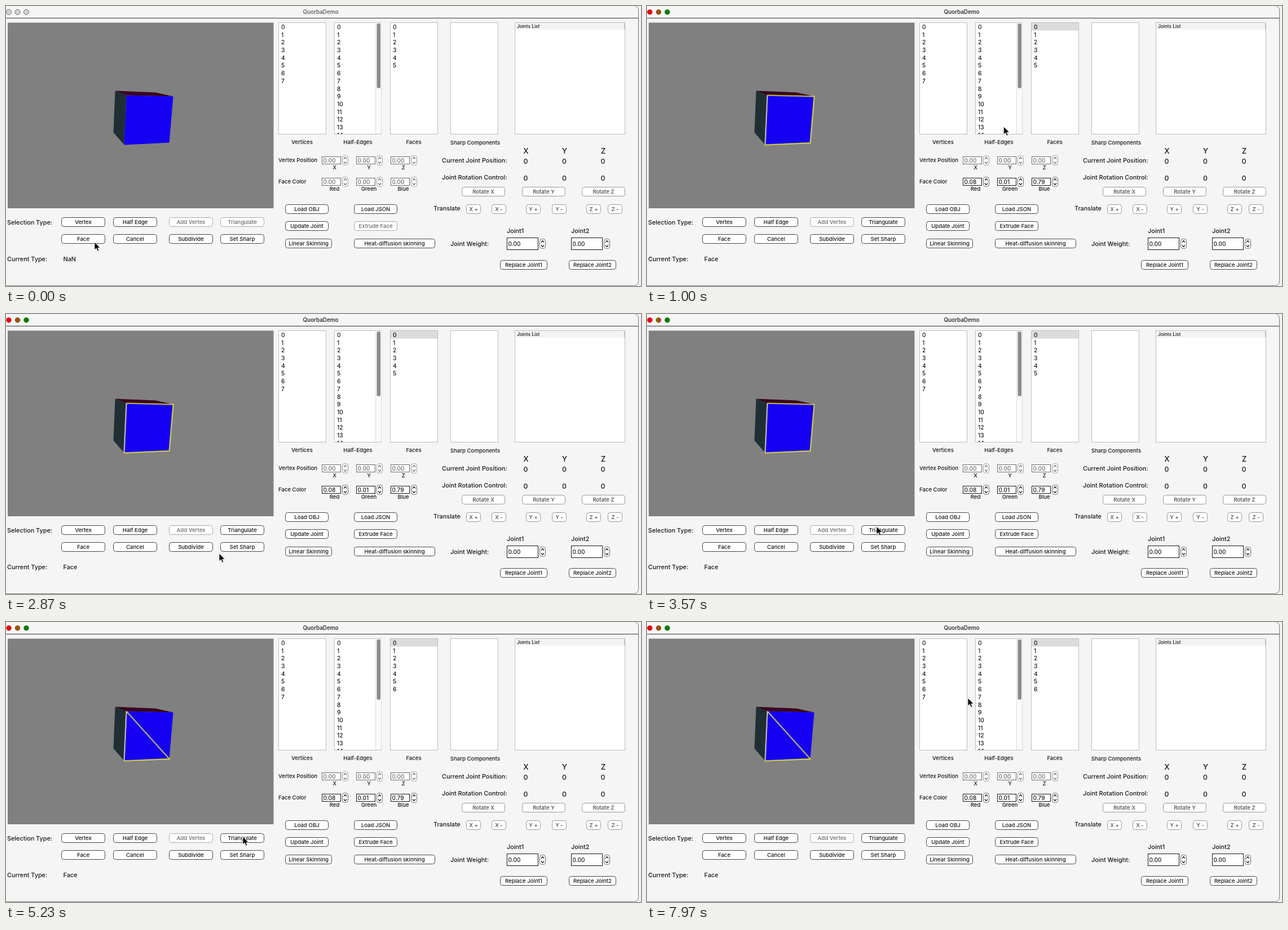
Write an HTML page that moves like this. It is 1126 px wide and 497 px high and loops after 8000 ms.

```html
<!DOCTYPE html>
<html lang="en">
<head>
<meta charset="utf-8">
<style>
html, body { margin: 0; width: 100%; height: 100%; overflow: hidden; background: #f3f3f3; }
svg { display: block; width: 1126px; height: 497px; font-family: Inter, Roboto, sans-serif; }
text { white-space: pre; font-weight: 500; }

/* Pairs of states: -off shows before the switch, -on after it. */
[class$="-off"], [class$="-on"] { animation: 8s step-end infinite; }
.focus-off { animation-name: focus-off; }
.focus-on { animation-name: focus-on; }
.mode-off { animation-name: mode-off; }
.mode-on { animation-name: mode-on; }
.pick-off { animation-name: pick-off; }
.pick-on { animation-name: pick-on; }
.split-off { animation-name: split-off; }
.split-on { animation-name: split-on; }
@keyframes focus-off { 0% { opacity: 1 } .6%, 100% { opacity: 0 } }
@keyframes focus-on { 0% { opacity: 0 } .6%, 100% { opacity: 1 } }
@keyframes mode-off { 0% { opacity: 1 } 1.4%, 100% { opacity: 0 } }
@keyframes mode-on { 0% { opacity: 0 } 1.4%, 100% { opacity: 1 } }
@keyframes pick-off { 0% { opacity: 1 } 6%, 100% { opacity: 0 } }
@keyframes pick-on { 0% { opacity: 0 } 6%, 100% { opacity: 1 } }
@keyframes split-off { 0% { opacity: 1 } 61%, 100% { opacity: 0 } }
@keyframes split-on { 0% { opacity: 0 } 61%, 100% { opacity: 1 } }

#cursor { animation: roam 8s linear infinite; }
@keyframes roam {
  0% { transform: translate(157px, 419px) }
  .8% { transform: translate(157px, 419px); animation-timing-function: ease-in-out }
  5.5% { transform: translate(248px, 205px) }
  7% { transform: translate(249px, 205px); animation-timing-function: ease-in }
  12.5% { transform: translate(632px, 214px); animation-timing-function: ease-out }
  16.25% { transform: translate(705px, 206px) }
  20% { transform: translate(705px, 206px); animation-timing-function: ease-in-out }
  30.2% { transform: translate(600px, 318px); animation-timing-function: ease-in-out }
  35.9% { transform: translate(378px, 425px); animation-timing-function: ease-in-out }
  40.4% { transform: translate(404px, 387px); animation-timing-function: ease-out }
  41.6%, 44.6% { transform: translate(407px, 377px) }
  45.4% { transform: translate(408px, 377px) }
  49.6% { transform: translate(408px, 377px); animation-timing-function: ease-out }
  54% { transform: translate(419px, 381px) }
  57% { transform: translate(420px, 381px) }
  75% { transform: translate(420px, 381px); animation-timing-function: ease-in-out }
  85.4% { transform: translate(251px, 261px); animation-timing-function: ease-out }
  87.9% { transform: translate(248px, 200px) }
  92.5% { transform: translate(248px, 200px); animation-timing-function: ease-in-out }
  99.6%, 100% { transform: translate(569px, 135px) }
}
</style>
</head>
<body>
<svg id="stage" viewBox="0 0 1126 497"></svg>
<script>
const INK = '#161616', DIM = '#6a6a6a';
const SMALL = 9.6, LABEL = 10.85;

// Every y passed to text() is the middle of the capitals.
const text = (x, y, s, size = SMALL, anchor = 'start', fill = INK, extra = '') =>
  `<text x="${x}" y="${(y + size * .364).toFixed(2)}" font-size="${size}" text-anchor="${anchor}" fill="${fill}" ${extra}>${s}</text>`;
const mid = (x, y, s, size, fill) => text(x, y, s, size, 'middle', fill);
const rect = (x, y, w, h, fill, stroke = 'none', r = 0) =>
  `<rect x="${x}" y="${y}" width="${w}" height="${h}" rx="${r}" fill="${fill}" stroke="${stroke}"/>`;
const path = (d, fill, stroke = 'none', w = 1) =>
  `<path d="${d}" fill="${fill}" stroke="${stroke}" stroke-width="${w}"/>`;
const group = (name, ...parts) => `<g class="${name}">${parts.join('')}</g>`;
const swap = (name, before, after) => group(name + '-off', before) + group(name + '-on', after);

const button = (x, y, w, s, ink = INK, line = '#484848') =>
  rect(x + .5, y - 8, w - 1, 16, '#fff', line, 4) + mid(x + w / 2, y, s, SMALL, ink);
const dimButton = (x, y, w, s) => button(x, y, w, s, DIM, '#a8a8a8');
const paleButton = (x, y, w, s) => button(x, y, w, s, '#484848', '#979797');

const spin = (x, y, w, h, s, ink) => {
  const sx = x + w + 2.5, cx = sx + 5;
  return rect(x + .5, y - h / 2, w - 1, h, '#fff', ink) +
    text(x + 2.5, y + .3, s, 10, 'start', ink) +
    rect(sx, y - 8.5, 10, 17, '#fff', ink === INK ? '#666' : '#999', 4) +
    path(`M${cx - 2.5} ${y - 2.5}l2.5-3 2.5 3M${cx - 2.5} ${y + 2.5}l2.5 3 2.5-3`, 'none', ink, 1.2);
};
const rows = (x, from, to) => {
  let out = '';
  for (let i = from; i <= to; i++) out += text(x, 37.2 + 13.7 * i, i, 10.2);
  return out;
};
const list = (x, w) => rect(x + .5, 29.5, w, 198, '#fff', '#bdbdbd');
const lights = (fills, line) => fills.map((c, i) =>
  `<circle cx="${5 + 15.5 * i}" cy="10.8" r="4.6" fill="${c}" stroke="${line}" stroke-width=".8"/>`).join('');
const title = fill => text(558, 10.5, 'QuorbaDemo', 9.8, 'middle', fill, 'style="font-weight:600"');

const frame = rect(-20, -.5, 1141.5, 497, '#f5f5f5', '#777', 8) +
  path('M0 21.5H1121', 'none', '#333') +
  swap('focus', lights(['#d2d2d2', '#d2d2d2', '#d2d2d2'], '#555') + title('#666'),
    lights(['#ec0010', '#995500', '#087c08'], '#0003') + title('#333'));

const edge = '#ffff20', pale = '#fffcae';
const side = path('M213 158L209 246', 'none', pale, 1.6);
const cube = path('M193 150L213 158 209 246 190 224Z', '#1f2f33') +
  path('M193 150L265 153 296 160 213 158Z', '#3a0420') +
  path('M213 158L296 160 289 242 209 246Z', '#1600f3') +
  group('pick-on', swap('split',
    path('M209 246L289 242.5 296 160 213 158', 'none', edge, 1.6) + side,
    path('M209 246L289 242.5 213 158', 'none', edge, 1.6) + side));
const view = rect(3, 29.5, 471.5, 329.5, '#808080') + `<g transform="translate(.5 .5)">${cube}</g>`;

const thumb = h => rect(657.5, 31, 6.5, h, '#8b8b8b', 'none', 3.2);
const lists = list(483, 84) + rows(488, 0, 7) +
  list(582, 83) + rect(655, 30, 10.5, 197, '#fafafa') + path('M655.5 30V227', 'none', '#ddd') +
  `<clipPath id="clip"><path d="M583 30h72v197h-72z"/></clipPath>` +
  `<g clip-path="url(#clip)">${rows(587, 0, 14)}</g>` +
  swap('split', thumb(115), thumb(107)) +
  list(681, 84) + group('pick-on', rect(682, 30, 83, 13.7, '#dcdcdc')) +
  rows(686, 0, 5) + group('split-on', rows(686, 6, 6)) +
  list(788, 84) + list(902, 195) +
  rect(903, 30, 194, 12, '#f4f4f4') + path('M1096.5 31V41', 'none', '#bbb') +
  text(906, 36.3, 'Joints List', 8.3) +
  mid(525, 241.5, 'Vertices') + mid(624, 241.5, 'Half-Edges') +
  mid(723, 241.5, 'Faces') + mid(832, 242.5, 'Sharp Components');

const columns = [560, 621, 682];
const spins = (y, values, ink) => columns.map((x, i) => spin(x, y, 34, 13, values[i], ink)).join('');
const names = (y, s) => columns.map((x, i) => mid(x + 22.5, y, s[i])).join('');
const zeros = ['0.00', '0.00', '0.00'];
const values = text(483, 273.5, 'Vertex Position') + spins(274, zeros, DIM) + names(287, 'XYZ') +
  text(483, 311.5, 'Face Color') +
  swap('pick', spins(312, zeros, DIM), spins(312, ['0.08', '0.01', '0.79'], INK)) +
  names(325, ['Red', 'Green', 'Blue']);

const tools = text(2, 384, 'Selection Type:', LABEL) +
  button(98, 383.5, 78, 'Vertex') + button(190, 383.5, 78, 'Half Edge') +
  dimButton(289, 383.5, 78, 'Add Vertex') +
  swap('pick', dimButton(380, 383.5, 78, 'Triangulate'), button(380, 383.5, 78, 'Triangulate')) +
  ['Face', 'Cancel', 'Subdivide', 'Set Sharp'].map((s, i) =>
    button([98, 190, 289, 380][i], 413.5, 78, s)).join('') +
  text(2, 449, 'Current Type:', LABEL) +
  swap('mode', text(101.5, 449, 'NaN', LABEL), text(101.5, 449, 'Face', LABEL)) +
  button(495, 360.5, 77, 'Load OBJ') + button(617, 360.5, 77, 'Load JSON') +
  button(495, 390.5, 77, 'Update Joint') +
  swap('pick', dimButton(617, 390.5, 77, 'Extrude Face'), button(617, 390.5, 77, 'Extrude Face')) +
  button(495, 421.5, 83, 'Linear Skinning') + button(617, 421.5, 144, 'Heat-diffusion skinning');

const axes = ['X', 'Y', 'Z'].map((a, i) => {
  const x = 922 + 68.5 * i;
  return mid(x, 257, a, 13.4) + mid(x - .5, 275.5, '0', 12.3) + mid(x - .5, 306, '0', 12.3) +
    paleButton([808, 915, 1021][i], 329.5, 77, 'Rotate ' + a) +
    paleButton([816, 922, 1029][i], 360.5, 26, a + ' +') +
    paleButton([861, 968, 1067][i], 360.5, 26, a + ' -');
}).join('');
const joints = axes + text(773, 274, 'Current Joint Position:', LABEL) +
  text(773, 304.5, 'Joint Rotation Control:', LABEL) + text(758, 359.5, 'Translate', LABEL) +
  text(788, 422.5, 'Joint Weight:', LABEL) +
  text(888, 399.5, 'Joint1', LABEL) + text(1002, 399.5, 'Joint2', LABEL) +
  spin(888, 422, 56, 21, '0.00', INK) + spin(1002, 422, 56, 21, '0.00', INK) +
  button(876, 459.5, 84, 'Replace Joint1') + button(998, 459.5, 84, 'Replace Joint2');

const cursor = '<g id="cursor">' +
  path('M0 0V14L3.2 11 5.5 16.2 7.8 15.2 5.6 10.2H10Z', '#000', '#fff', .8) + '</g>';

document.getElementById('stage').innerHTML = frame + view + lists + values + tools + joints + cursor;
</script>
</body>
</html>
```
